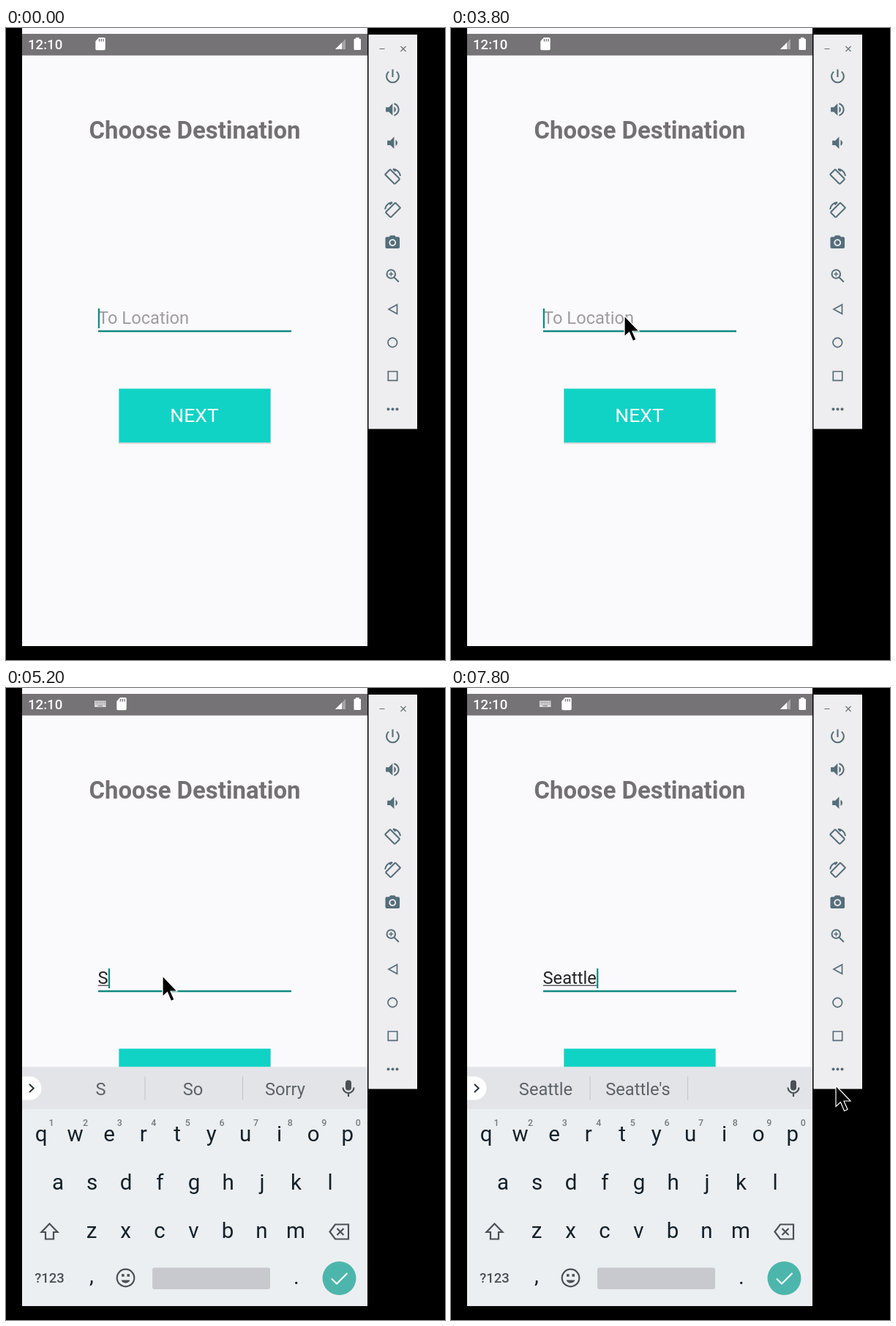
Write an HTML page that moves like this. It is 600 by 863 pixels and loops after 8000 ms.

```html
<!DOCTYPE html>
<html lang="en">
<head>
<meta charset="utf-8">
<title>Choose Destination</title>
<style>
html, body { margin: 0; width: 100%; height: 100%; overflow: hidden; background: #000; }
svg { display: block; width: 600px; height: 863px; font-family: Roboto, sans-serif; }
.mid { text-anchor: middle; }
.line { fill: none; stroke-width: 2; }
.icons { fill: #546e7a; stroke: #546e7a; }
.icons > :not(.line) { stroke: none; }
.icons .line { fill: none; }
.field { font-size: 23.7px; }
.key { font-size: 29.5px; fill: #14212a; text-anchor: middle; }
.num { font-size: 12.5px; font-weight: 500; fill: #777b7f; text-anchor: middle; }
.word { font-size: 23.7px; fill: #5d6267; text-anchor: middle; }
</style>
</head>
<body>
<svg viewBox="0 0 600 863">
  <path fill="#faf9fb" d="M22 0h472v844H22z"/>
  <path fill="#757375" d="M22 8h472v29.5H22z"/>
  <text x="30" y="29" font-size="18.6" font-weight="500" fill="#fff">12:10</text>
  <g id="tiny" fill="#dcdbdc">
    <path d="M121 17.5h15.5v8.5H121z"/>
    <path fill="none" stroke="#757375" stroke-width="1.2" stroke-dasharray="1.2 1.1" d="M122.5 19.7h13M122.5 22h13"/>
    <path stroke="#757375" d="M125.5 24.4h6.5"/>
  </g>
  <g id="card">
    <path fill="#fff" d="M-2 -8.5H5q1.7 0 1.7 1.7V7q0 1.7 -1.7 1.7H-5q-1.7 0 -1.7 -1.7V-3.5z"/>
    <path stroke="#757375" stroke-width="1.3" d="M-1.5 -6.5v3.4M1.3 -6.5v3.4M4.1 -6.5v3.4"/>
  </g>
  <path fill="#a5a4a5" d="M464 15v14h-14z"/>
  <path fill="#fff" d="M459 20v9h-9z"/>
  <path fill="#fff" d="M478 13h4.5v1.8h1.4q1.1 0 1.1 1.1v13q0 1.1 -1.1 1.1h-7.3q-1.1 0 -1.1 -1.1v-13q0 -1.1 1.1 -1.1h1.4z"/>

  <text class="mid" x="258" y="150.7" font-size="32.9" font-weight="700" fill="#737073">Choose Destination</text>

  <text id="hint" class="field" x="126" y="404" fill="#9f9c9f">To Location</text>
  <text id="typed" class="field" x="125.5" y="404" fill="#242426"></text>
  <rect id="spell" x="126" y="405.6" height="1.2" fill="#3a3a3c"/>
  <path fill="#10897f" d="M126 412.8h264v2.5H126z"/>
  <rect id="caret" y="383" width="2.2" height="27" fill="#10897f"/>

  <path fill="#d9d9db" d="M154 493h208v75H154z"/>
  <path fill="#10d3c5" d="M154.500 492.500h207v73.500h-207z"/>
  <text class="mid" x="257.5" y="538" font-size="26.5" fill="#fff">NEXT</text>

  <g id="board">
    <path fill="#eceff1" d="M22 517.500h472V844H22z"/>
    <path fill="#e3e4e7" d="M22 517.500h472V575H22z"/>
    <path fill="#fff" d="M22 530.500h10.500a16 16 0 0 1 0 32H22z"/>
    <path class="line" stroke="#263238" stroke-width="2.5" d="M32 541l5.700 5.500-5.700 5.500"/>
    <path stroke="#c5c8cb" stroke-width="1.2" d="M190 530.500v32M323.500 530.500v32"/>
    <g id="words"></g>
    <g id="keys"></g>
    <g fill="none" stroke="#4a5055" stroke-width="2.2">
      <rect x="464" y="535.500" width="8" height="14" rx="4" fill="#4a5055" stroke="none"/>
      <path d="M460.500 545.500a7.500 7.500 0 0 0 15 0M468 553v5"/>
      <path d="M59.500 731.500L48.500 743h5.500v9.500h11V743h5.500z"/>
      <path d="M450 732.500h18v20h-18l-7.500-10zM452.500 738l9 9M461.500 738l-9 9"/>
      <circle cx="163.500" cy="805.500" r="11.800"/>
      <path d="M157.500 808.500a6.500 6.500 0 0 0 12 0z" fill="#4a5055" stroke="none"/>
      <path d="M158 802h3.600M165.400 802h3.600" stroke-width="3.400"/>
    </g>
    <text class="mid" x="59.500" y="812" font-size="18.500" font-weight="500" fill="#4a5055">?123</text>
    <rect x="200" y="791.500" width="161" height="29.500" rx="3" fill="#c7c9ce"/>
    <circle cx="455.500" cy="806" r="23" fill="#4db6ac"/>
    <path class="line" stroke="#fff" stroke-width="2.500" d="M445 806.500l7 7 14.500-14.500"/>
  </g>

  <path fill="#eeedef" d="M495.500 9H562v538.500h-66.500z"/>
  <g class="icons">
    <path class="line" stroke="#667075" style="stroke-width:1.2" d="M510.500 28.500h7M539.500 25l7 7M546.500 25l-7 7"/>
    <path transform="translate(516 53.500) scale(1.04)" d="M13 3h-2v10h2V3zm4.830 2.170l-1.420 1.420C17.990 7.860 19 9.810 19 12c0 3.870-3.130 7-7 7s-7-3.130-7-7c0-2.190 1.010-4.140 2.580-5.420L6.170 5.170C4.230 6.820 3 9.260 3 12c0 4.970 4.030 9 9 9s9-4.030 9-9c0-2.740-1.230-5.180-3.170-6.830z"/>
    <path transform="translate(516 99) scale(1.030)" d="M3 9v6h4l5 5V4L7 9H3zm13.500 3c0-1.770-1.020-3.290-2.500-4.030v8.050c1.480-.73 2.500-2.250 2.500-4.020zM14 3.230v2.060c2.890.86 5 3.540 5 6.710s-2.110 5.850-5 6.710v2.060c4.010-.91 7-4.490 7-8.770s-2.990-7.860-7-8.770z"/>
    <path transform="translate(516 144.500) scale(1.030)" d="M18.500 12c0-1.770-1.020-3.290-2.500-4.030v8.050c1.480-.73 2.500-2.250 2.500-4.020zM5 9v6h4l5 5V4L9 9H5z"/>
    <path id="turn" class="line" transform="translate(528.500 202.500)" d="M-4 -9L-10 -3Q-10.500 -2.500 -10 -2L2 10Q2.700 10.500 3.500 10L9 4.500Q9.500 3.800 9 3L-3 -9Q-3.500 -9.500 -4 -9zM0.500 -10A11 11 0 0 1 10.500 -0.500M0.500 -10l3.500 3.200"/>
    <use class="line" href="#turn" transform="translate(1057 45.500) scale(-1 1)"/>
    <path transform="translate(516.500 281.300) scale(.98)" fill-rule="evenodd" d="M9 2L7.170 4H4c-1.100 0-2 .9-2 2v12c0 1.100.9 2 2 2h16c1.100 0 2-.9 2-2V6c0-1.100-.9-2-2-2h-3.170L15 2H9zm3 15c-2.760 0-5-2.240-5-5s2.240-5 5-5 5 2.240 5 5-2.240 5-5 5z"/>
    <circle cx="528.300" cy="293" r="3"/>
    <path class="line" d="M520.500 336a5.800 5.800 0 1 0 11.600 0a5.800 5.800 0 1 0 -11.600 0M530.500 340.500l6.300 6.300"/>
    <path class="line" style="stroke-width:1.4" d="M526.300 333v6M523.300 336h6"/>
    <g class="line" style="stroke-width:1.7">
      <path d="M523 384l11.500-6.300v12.600z"/>
      <circle cx="528.300" cy="429.500" r="6.300"/>
      <path d="M522.300 469h12.400v12.400h-12.400z"/>
    </g>
    <circle cx="522.500" cy="520.500" r="2"/><circle cx="528.500" cy="520.500" r="2"/><circle cx="534.500" cy="520.500" r="2"/>
  </g>
  <path id="mouse" stroke="#fff" stroke-width="1.200" d="M0 0V28.500L6.500 22.500L11.500 34.500L16 32.500L11 21H20z"/>
</svg>
<script>
const $ = id => document.getElementById(id);
const label = (cls, x, y, s) => `<text class="${cls}" x="${x}" y="${y}">${s}</text>`;

const row = (s, x, y) => [...s].map((c, i) => label('key', x + i * 46.5, y, c)).join('');
$('keys').innerHTML = row('qwertyuiop', 48.2, 619) + row('asdfghjkl', 71, 685) +
  row('zxcvbnm', 117, 751) + label('key', 117, 812, ',') + label('key', 397, 814, '.') +
  [...'1234567890'].map((c, i) => label('num', 62 + i * 46.6, 597.5, c)).join('');

// Each entry: start time in ms, then its values
const typing = [
  [0, ''],
  [5200, 'S', 'S', 'So', 'Sorry'],
  [5400, 'Se', 'Se', 'See', 'Send'],
  [5800, 'Sea', 'Sea', 'Search', 'Seat'],
  [6200, 'Seat', 'Seat', 'Seats', 'Seattle'],
  [6400, 'Seatt', 'Seatt', 'Seattle', 'Seats'],
  [6600, 'Seattl', 'Seattl', 'Seattle', "Seattle's"],
  [6800, 'Seattle', 'Seattle', "Seattle's", '']
];
const pointer = [
  [0, -99, -99], [200, 228, 505], [600, 236, 490], [800, 262, 440], [1000, 285, 403],
  [1200, 293, 390], [3800, 237, 393], [4000, 225, 393], [4200, 218, 393], [4600, 214, 393],
  [7200, 262, 480], [7400, 350, 680], [7600, 440, 830], [7800, 526, 543]
];
const at = (list, t) => list.findLast(e => e[0] <= t);
const show = (id, on) => $(id).style.visibility = on ? 'visible' : 'hidden';

function draw(t) {
  const [start, text, ...words] = at(typing, t);
  const [, x, y] = at(pointer, t);
  $('mouse').setAttribute('transform', `translate(${x} ${y})`);

  $('typed').textContent = text;
  const width = text ? $('typed').getComputedTextLength() : 0;
  $('spell').setAttribute('width', width);
  $('caret').setAttribute('x', 125.8 + width);
  show('caret', text ? (t - start) % 1000 < 500 : t < 5000 && (t + 300) % 1000 < 500);
  show('hint', !text);
  show('board', text);
  $('words').innerHTML = words.map((w, i) => label('word', 129.5 + i * 126, 556, w)).join('');

  const slide = t < 5000 ? 0 : t < 5200 ? 20 : 29;
  $('card').setAttribute('transform', `translate(${129 + slide} 21.5)`);
  $('tiny').setAttribute('opacity', t < 5000 ? 0 : t < 5200 ? .1 : 1);
}

function frame(now) {
  draw(Math.floor(now % 8000 / 200) * 200);
  requestAnimationFrame(frame);
}
draw(0);
requestAnimationFrame(frame);
</script>
</body>
</html>
```
